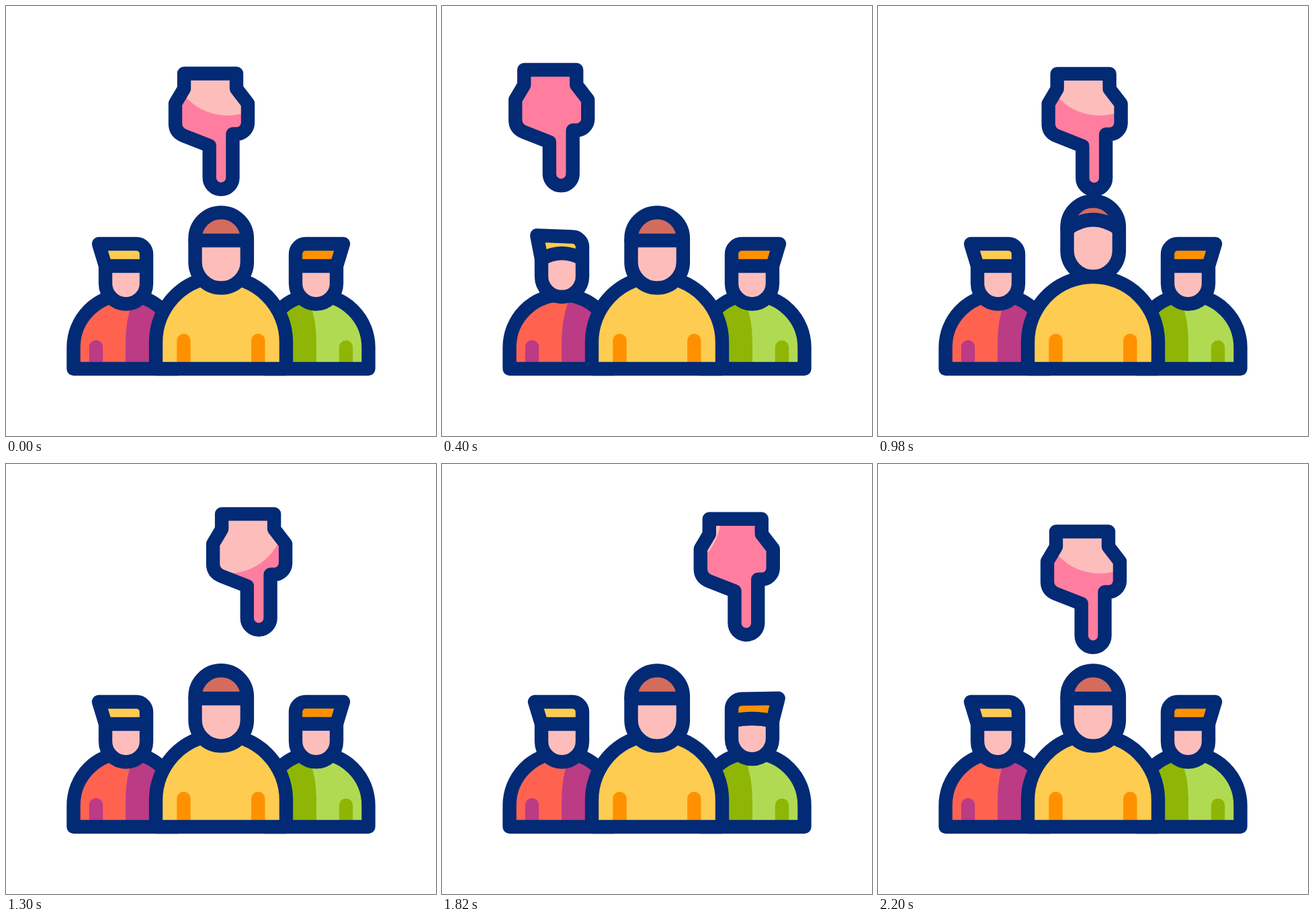
Animation of 640 by 640 pixels, one loop 2.4 s. Source, as an HTML page:

```html
<!DOCTYPE html>
<html lang="en">
<head>
<meta charset="utf-8">
<title>Choosing a person</title>
<style>
  html, body { margin: 0; width: 100%; height: 100%; overflow: hidden; background: #fff; }
  svg { display: block; width: 100vw; height: 100vh; }
  .line { fill: none; stroke: #032a75; stroke-width: 20.4; stroke-linejoin: round; stroke-linecap: round; }
  .arm { fill: none; stroke-width: 20.4; stroke-linecap: round; }
</style>
</head>
<body>
<svg viewBox="0 0 640 640">
  <defs>
    <path id="sideBody" d="M100.5 540V508A78 78 0 0 1 256.5 508V540Z"/>
    <path id="shade" d="M189 438Q178 466 178 500V540H256.5V508A78 78 0 0 0 189 430Z"/>
    <path id="hand" d="M265 100.5H343V123L360 145V174A17 17 0 0 1 343 190.5H337.5V255.5A17.4 17.4 0 0 1 302.7 255.5V208L265 193.2Q252 188 252 175V145L265 123Z"/>
    <clipPath id="handClip"><use href="#hand"/></clipPath>
  </defs>

  <g>
    <use href="#sideBody" fill="#ff6350"/>
    <use href="#shade" fill="#bc3b85"/>
    <path class="arm" stroke="#bc3b85" d="M134 507.500V530"/>
    <use href="#sideBody" class="line"/>
  </g>
  <g transform="translate(640 0) scale(-1 1)">
    <use href="#sideBody" fill="#b1da53"/>
    <use href="#shade" fill="#8fb606"/>
    <path class="arm" stroke="#8fb606" d="M134 508V530"/>
    <use href="#sideBody" class="line"/>
  </g>

  <path d="M223 540V500A97 97 0 0 1 417 500V540Z" fill="#fecc51"/>
  <path class="arm" stroke="#ff9100" d="M264.500 498V530M375.300 498V530"/>
  <path class="line" d="M223 540V500A97 97 0 0 1 417 500V540Z"/>

  <g id="left"></g>
  <g transform="translate(640 0) scale(-1 1)"><g id="right"></g></g>
  <g id="center"></g>

  <g id="pointer">
    <use href="#hand" fill="#ff7ea0"/>
    <g clip-path="url(#handClip)"><circle id="glow" r="85" fill="#fdbebb"/></g>
    <use href="#hand" class="line"/>
  </g>
</svg>
<script>
const LOOP = 2400, STEP = 20, END = 2200;
const $ = id => document.getElementById(id);

// Every head has a face, hair, an outline and a hat band.
function makeHead(id, hair) {
  const g = $(id);
  g.innerHTML = `<path fill="#fdbebb"/><path fill="${hair}"/><path class="line"/><path class="line"/>`;
  return { g, parts: [...g.children] };
}

function drawHead(head, lift, [x1, x2, y], top, chinY) {
  const r = (x2 - x1) / 2;
  const band = `Q${x1 + r} ${y - lift * 1.65} ${x1} ${y}`;
  const chin = `V${chinY}A${r} ${r} 0 0 0 ${x2} ${chinY}V${y}`;
  const shapes = [
    `M${x1} ${y}${chin}${band}Z`,
    `M${x1} ${y}${top}V${y}${band}Z`,
    `M${x1} ${y}${chin}M${x1} ${y}${top}V${y}`,
    `M${x2} ${y}${band}`
  ];
  head.g.setAttribute('transform', `translate(0 ${-lift})`);
  head.parts.forEach((p, i) => p.setAttribute('d', shapes[i]));
}

function drawSide(head, lift) {
  const e = lift * 0.3;
  const top = `L${138 + e} ${354 - e * 0.7}L194 354A15 15 0 0 1 209 369`;
  drawHead(head, lift, [148, 209, 387], top, 413);
}

function drawCenter(head, lift) {
  drawHead(head, lift, [281.5, 358.9, 349], 'V346A38.7 38.7 0 0 1 358.9 346', 381);
}

const bump = (t, peak, half, height) =>
  Math.abs(t - peak) < half ? height * (1 + Math.cos(Math.PI * (t - peak) / half)) / 2 : 0;

const clamp = u => Math.max(0, Math.min(1, u));
const smooth = u => u * u * (3 - 2 * u);

function bezier(p, u) {
  const v = 1 - u, w = [v * v * v, 3 * v * v * u, 3 * v * u * u, u * u * u];
  return [0, 1].map(k => p.reduce((sum, q, i) => sum + q[k] * w[i], 0));
}

const home = [0, 0], mid = [2, 1];
const leftEnd = [-143, -5], rightEnd = [142, -5];
const leftArc = [[-20, -34], [-135, -33]];
const rightArc = [[20, -28], [130, -48]];
const moves = [
  { from: 0, to: 420, path: [home, ...leftArc, leftEnd] },
  { from: 545, to: 1000, path: [leftEnd, leftArc[1], leftArc[0], mid] },
  { from: 1100, to: 1560, path: [mid, ...rightArc, rightEnd] },
  { from: 1715, to: 2180, path: [rightEnd, rightArc[1], rightArc[0], home] }
];

function pointerAt(t) {
  const m = moves.filter(m => m.from <= t).pop();
  return bezier(m.path, smooth(clamp((t - m.from) / (m.to - m.from))));
}

const left = makeHead('left', '#fecc51');
const right = makeHead('right', '#ff9100');
const center = makeHead('center', '#d46c5e');

function draw(time) {
  const t = Math.min(END, Math.floor((time % LOOP) / STEP) * STEP);
  drawSide(left, bump(t, 480, 340, 12));
  drawSide(right, bump(t, 1610, 330, 15));
  drawCenter(center, bump(t, 965, 340, 17));

  const [x, y] = pointerAt(t);
  $('pointer').setAttribute('transform', `translate(${x} ${y})`);
  // The light patch stays still while the hand moves through it.
  $('glow').setAttribute('cx', 330 - x);
  $('glow').setAttribute('cy', 78 - y);
}

let start = null;
function tick(now) {
  if (start === null) start = now;
  draw(now - start);
  requestAnimationFrame(tick);
}
draw(0);
requestAnimationFrame(tick);
</script>
</body>
</html>
```
